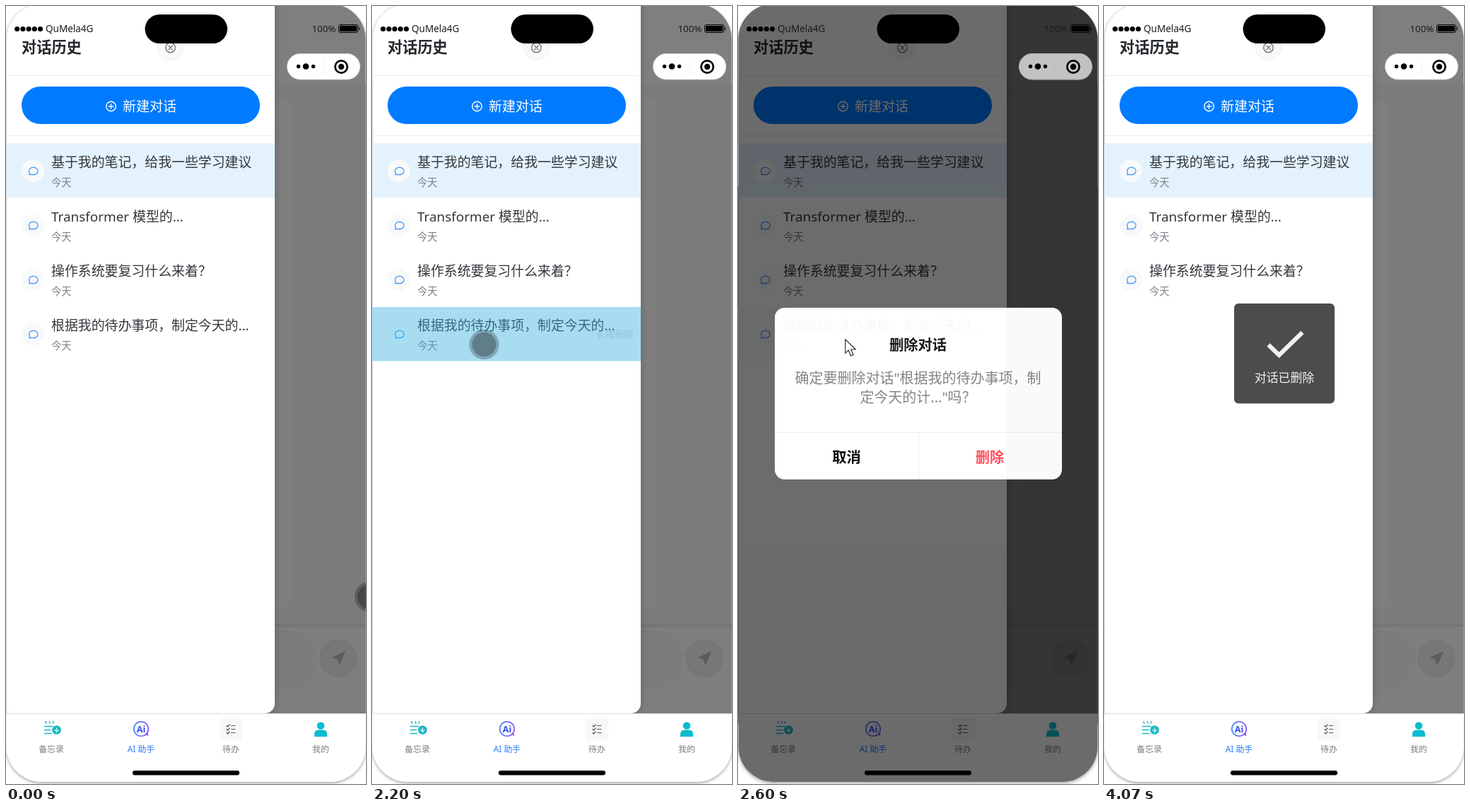
Recreate the animation shown at these times as an HTML page. Size 509x1101 px, loop 4.74 s.

```html
<!DOCTYPE html>
<html lang="zh-CN">
<head>
<meta charset="utf-8">
<title>对话历史</title>
<style>
html, body { margin: 0; width: 100%; height: 100%; overflow: hidden; background: #fff; }
svg { display: block; width: 509px; height: 1101px; font-family: "Noto Sans", "Noto Sans CJK SC", "Noto Sans CJK", sans-serif; }
.bold { font-weight: 700; }
.mid { text-anchor: middle; }
.line { fill: none; stroke-linecap: round; stroke-linejoin: round; }
.name { font-size: 18.9px; fill: #33373c; }
.date { font-size: 14.3px; fill: #7b8087; }
.tab { font-size: 11.9px; fill: #7d7d7d; text-anchor: middle; }
.status { font-weight: 300; fill: #1c1c1c; }
.drawer { filter: drop-shadow(2px 0 4px rgba(0, 0, 0, .15)); }
.phone { filter: drop-shadow(0 2px 2px rgba(0, 0, 0, .35)); }

.touch, .arrow, .dialog, .tint, .pressed, .hint, .row4, .toast { animation: 4740ms step-end infinite; }
.touch { animation-name: touch; }
.arrow { animation-name: arrow; }
.dialog { animation-name: dialog; }
.tint { animation-name: tint; }
.pressed { animation-name: pressed; }
.hint { animation-name: hint; }
.row4 { animation-name: row4; }
.toast { animation-name: toast; }

@keyframes touch {
  0% { transform: translate(514px, 836px); opacity: 1; }
  1.47% { transform: translate(514px, 836px); opacity: 0; }
  11.18% { transform: translate(453px, 771px); opacity: 1; }
  12.65% { transform: translate(330px, 612px); }
  14.13% { transform: translate(225px, 490px); }
  15.4% { transform: translate(160px, 422px); }
  16.87% { transform: translate(134px, 402px); }
  18.35% { transform: translate(139px, 400px); }
  19.61% { transform: translate(143.5px, 400px); }
  25.31% { transform: translate(146px, 400px); }
  26.79% { transform: translate(148px, 400px); }
  33.75% { transform: translate(149px, 408px); }
  35.23% { transform: translate(153px, 432px); }
  36.49% { transform: translate(156px, 458px); }
  37.97% { transform: translate(158px, 474px); }
  39.45% { transform: translate(158.5px, 479px); opacity: 1; }
  50.63% { transform: translate(158.5px, 479px); opacity: 0; }
  67.51% { transform: translate(375px, 656px); opacity: 1; }
  68.98% { transform: translate(377px, 655px); }
  71.72% { transform: translate(381px, 652px); }
  73.2% { transform: translate(385px, 649px); }
  74.47% { transform: translate(389px, 646px); }
  75.94% { transform: translate(393px, 643px); }
  77.42% { transform: translate(391px, 652px); }
  78.69% { transform: translate(380px, 690px); }
  80.16% { transform: translate(357px, 765px); }
  81.64% { transform: translate(325px, 862px); }
  82.91% { transform: translate(290px, 970px); }
  84.38% { transform: translate(261px, 1063px); opacity: 1; }
  85.86%, 100% { transform: translate(261px, 1063px); opacity: 0; }
}
@keyframes arrow {
  0% { transform: translate(151px, 471px); opacity: 0; }
  50.63% { transform: translate(151px, 471px); opacity: 1; }
  59.07% { transform: translate(215px, 522px); }
  60.54% { transform: translate(310px, 610px); }
  61.81% { transform: translate(363px, 653px); opacity: 1; }
  67.51%, 100% { transform: translate(363px, 653px); opacity: 0; }
}
@keyframes dialog {
  0% { opacity: 0; }
  50.63% { opacity: .12; }
  52.1% { opacity: .62; }
  53.37% { opacity: .85; }
  54.85% { opacity: .967; }
  56.32% { opacity: 1; }
  66.03% { opacity: .5; }
  67.51%, 100% { opacity: 0; }
}
@keyframes tint { 0% { opacity: 0; } 46.41% { opacity: .4; } 49.15%, 100% { opacity: 0; } }
@keyframes pressed { 0% { opacity: 0; } 46.41%, 100% { opacity: 1; } }
@keyframes hint { 0% { opacity: .3; } 50.63%, 100% { opacity: 0; } }
@keyframes row4 { 0% { opacity: 1; } 67.51%, 100% { opacity: 0; } }
@keyframes toast { 0% { opacity: 0; } 67.51%, 100% { opacity: 1; } }
</style>
</head>
<body>
<svg viewBox="0 0 509 1101">
  <defs>
    <clipPath id="screen"><rect x=".5" y="-3" width="508" height="1101" rx="50"/></clipPath>
    <linearGradient id="violet"><stop stop-color="#3d7dfb"/><stop offset="1" stop-color="#8a4df5"/></linearGradient>
    <g id="bubble">
      <circle r="16" fill="#f8f9fa"/>
      <path class="line" d="M-5.2 5.2 -4.4 2.9A6.3 5.2 0 1 1 -1.6 4.8Z" stroke="#3f97ff" stroke-width="1.3"/>
    </g>
  </defs>

  <rect class="phone" x=".5" y="-3" width="508" height="1101" rx="50" fill="#fff"/>

  <g clip-path="url(#screen)">
    <!-- dimmed chat page -->
    <rect width="509" height="1001" fill="#7f7f7f"/>
    <rect y="110" width="509" height="768" fill="#7c7c7c"/>
    <rect x="300" y="129" width="105.5" height="725" rx="18" fill="#7e7e7e" stroke="#797979"/>
    <rect y="875" width="509" height="4" fill="#757575"/>
    <rect y="879" width="509" height="122" fill="#7e7e7e"/>
    <rect x="200" y="885" width="237.5" height="80" rx="38" fill="#7c7c7c" stroke="#797979"/>
    <circle cx="470" cy="923" r="26" fill="#777" stroke="#737373"/>
    <path d="M480 913 460.5 922 468 924.5 471.5 933.5Z" fill="#5c5c5c"/>

    <!-- history drawer -->
    <path class="drawer" d="M0 -10H380V987A14 14 0 0 1 366 1001H0Z" fill="#fff"/>
    <circle cx="232.5" cy="58" r="18.5" fill="#f8f9fa" stroke="#eceef0"/>
    <g class="line" stroke="#6a6a6a" stroke-width="1.3">
      <circle cx="232.5" cy="59" r="6.8"/>
      <path d="M230 56.5l5 5m0-5-5 5"/>
    </g>
    <text class="bold" x="22" y="66" font-size="21.2" fill="#24282d">对话历史</text>
    <path d="M0 98.5H380M0 183.5H380" stroke="#e9ecef"/>
    <rect x="22" y="114" width="337" height="53" rx="26.5" fill="#007bff"/>
    <g class="line" stroke="#fff" stroke-width="1.4">
      <circle cx="148.5" cy="142" r="6.8"/>
      <path d="M145.3 142h6.4m-3.2-3.2v6.4"/>
    </g>
    <text x="165" y="148.5" font-size="19" font-weight="500" fill="#fff">新建对话</text>

    <rect y="194" width="380" height="77" fill="#e3f2fd"/>
    <use href="#bubble" x="38" y="233.5"/>
    <text class="name" x="64" y="228">基于我的笔记，给我一些学习建议</text>
    <text class="date" x="64" y="254.5">今天</text>

    <use href="#bubble" x="38" y="310.5"/>
    <text class="name" x="64" y="305">Transformer 模型的...</text>
    <text class="date" x="64" y="331.5">今天</text>

    <use href="#bubble" x="38" y="387.5"/>
    <text class="name" x="64" y="382">操作系统要复习什么来着？</text>
    <text class="date" x="64" y="408.5">今天</text>

    <g class="row4">
      <g class="pressed">
        <rect y="426" width="380" height="76.5" fill="#f8f9fa"/>
        <text class="hint" x="317" y="469" font-size="13" fill="#777">长按删除</text>
      </g>
      <use href="#bubble" x="38" y="464.5"/>
      <text class="name" x="64" y="459">根据我的待办事项，制定今天的...</text>
      <text class="date" x="64" y="486">今天</text>
      <rect class="tint" y="426" width="380" height="76.5" fill="#33b5e5"/>
    </g>

    <!-- tab bar -->
    <rect y="1001" width="509" height="100" fill="#fff"/>
    <path d="M0 1001.5H509" stroke="#dcdcdc"/>
    <g class="line" stroke="#19b9c6" stroke-width="1.5">
      <path d="M56 1012.5l.8 2.5m4.700-2.500.4 2.500m4.900-2.500-.4 2.500M54.500 1019.500H66M54.500 1024.500H63M54.500 1029.500H64"/>
      <circle cx="71.5" cy="1024.5" r="5.600" fill="#19b9c6"/>
      <path d="M71.5 1021.8v2.400m-2.400.4q2.400 3.200 4.800 0m-2.400 1.600v1.500" stroke="#fff" stroke-width="1.200"/>
    </g>
    <circle cx="191" cy="1023" r="10.3" fill="#f5f7ff" stroke="url(#violet)" stroke-width="1.6"/>
    <path d="M197 1030.5l4.5 3-1.5-6Z" fill="#8a4df5"/>
    <text class="bold mid" x="191" y="1027.5" font-size="12.5" fill="#3c4ff0">Ai</text>
    <rect x="302" y="1008" width="32" height="32" fill="#f8f8f8"/>
    <path class="line" d="M312 1018.5l1.500 1.500 2.500-3m-4 6.500 1.500 1.500 2.500-3m-4 6.500 1.500 1.500 2.500-3M318.500 1018.500H324M318.500 1023.500H324M318.500 1028.500H324" stroke="#555" stroke-width="1.2"/>
    <g fill="#0bbccf">
      <circle cx="445" cy="1018.5" r="5.3"/>
      <path d="M436 1034v-3.500q0-6 6-6h6q6 0 6 6v3.500Z"/>
    </g>
    <text class="tab" x="64" y="1055.5">备忘录</text>
    <text class="tab" x="191" y="1055.5" style="fill:#2979ff">AI 助手</text>
    <text class="tab" x="318" y="1055.5">待办</text>
    <text class="tab" x="445" y="1055.5">我的</text>

    <g class="dialog">
      <rect width="509" height="1101" fill-opacity=".6"/>
      <rect x="52" y="427" width="406" height="243" rx="14" fill="#fff"/>
      <path d="M52 603.5H458M255.5 604V670" stroke="#ececec"/>
      <g class="mid" font-size="20.2">
        <text class="bold" x="254.5" y="487" fill="#111">删除对话</text>
        <g font-size="20" fill="#808080">
          <text x="254.5" y="534">确定要删除对话"根据我的待办事项，制</text>
          <text x="254.5" y="561">定今天的计..."吗？</text>
        </g>
        <text class="bold" x="153.5" y="646" fill="#000">取消</text>
        <text class="bold" x="356" y="646" fill="#ff4757">删除</text>
      </g>
    </g>
  </g>

  <!-- system chrome -->
  <g>
    <rect x="397.5" y="67.5" width="103" height="36.5" rx="18.25" fill="#fff" stroke="#d2d2d2"/>
    <rect class="dialog" x="397.5" y="67.5" width="103" height="36.5" rx="18.25" fill-opacity=".25"/>
    <path d="M449.5 77v18" stroke="#000" stroke-opacity=".06"/>
    <circle cx="413.5" cy="85.5" r="2.7"/>
    <circle cx="424" cy="85.5" r="4.3"/>
    <circle cx="434.5" cy="85.5" r="2.7"/>
    <circle cx="474" cy="86" r="8.6" fill="none" stroke="#000" stroke-width="2.7"/>
    <circle cx="474" cy="86" r="4.2"/>
  </g>
  <path class="line" d="M15.7 32.5H49" stroke="#000" stroke-width="7.2" stroke-dasharray="0 8.2"/>
  <text class="status" x="56" y="36.5" font-size="13.5">QuMela4G</text>
  <text class="status" x="432.5" y="37" font-size="13.3">100%</text>
  <rect x="470.5" y="26.5" width="27" height="11" rx="2.5" fill="none" stroke="#000"/>
  <rect x="472" y="28" width="24" height="8" rx="1"/>
  <path d="M499 29.5q2.5 2.5 0 5Z"/>
  <rect x="196.5" y="12" width="116.5" height="41" rx="20.5"/>
  <rect x="179" y="1082" width="151" height="6.5" rx="3"/>

  <g class="toast">
    <rect x="184" y="421" width="142" height="141.5" rx="6" fill-opacity=".7"/>
    <path d="M232.5 479.5 247.5 494 280.5 462" fill="none" stroke="#f0f0f0" stroke-width="6"/>
    <text class="mid" x="255" y="531.5" font-size="16.8" fill="#f0f0f0">对话已删除</text>
  </g>

  <g class="touch">
    <circle r="19.2" fill="none" stroke="#000" stroke-opacity=".24" stroke-width="4"/>
    <circle r="17.2" fill-opacity=".43"/>
  </g>
  <path class="arrow" d="M.8 .8V20.2L5.2 16.2 8.6 24 12 22.5 8.6 15H15.2Z" fill="#fff" stroke="#222" stroke-width="1.1"/>
</svg>
</body>
</html>
```
